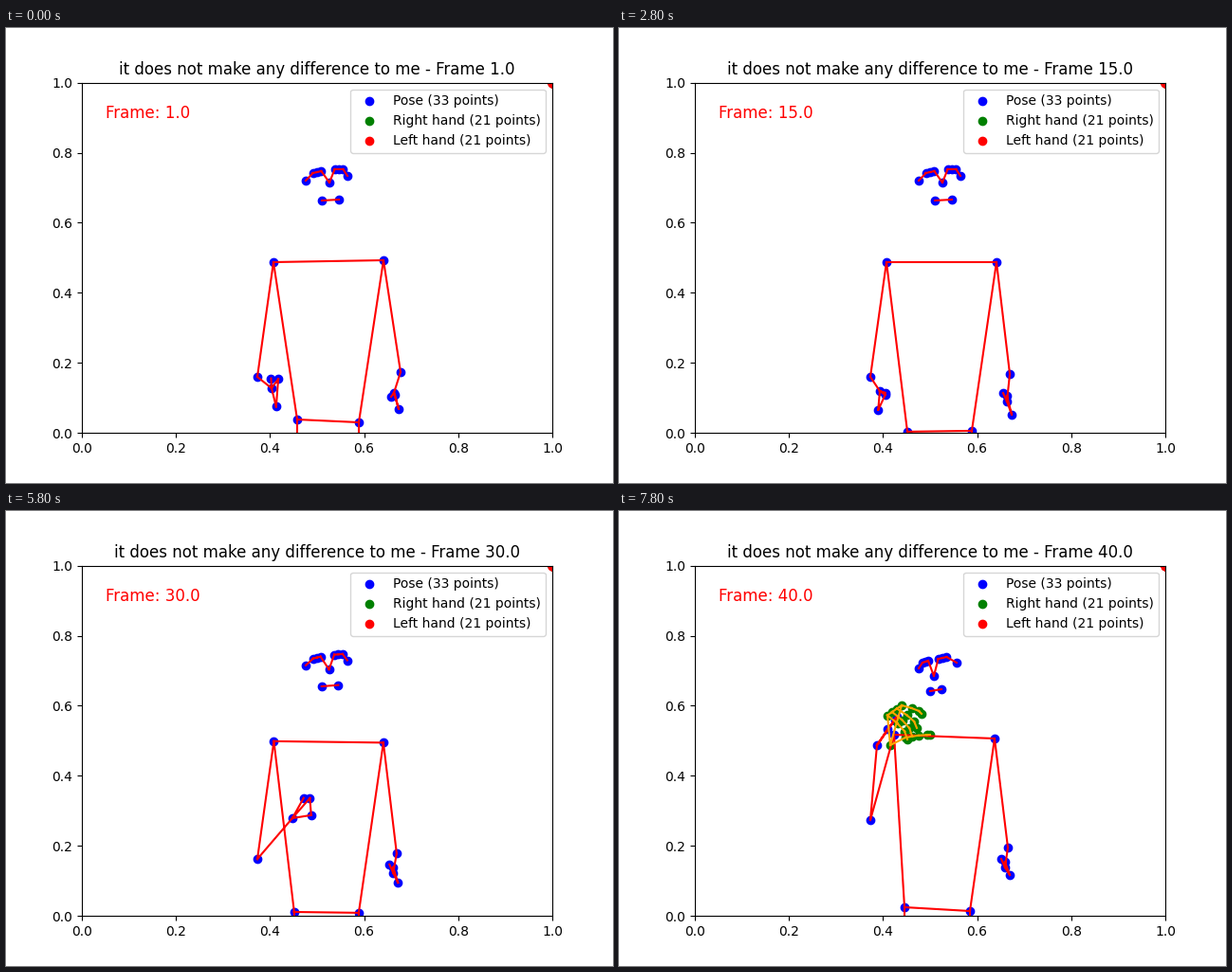
Animation, 640 px wide and 480 px high, one loop 8000 ms. Source, as a matplotlib script:

```python
import numpy as np
import matplotlib.pyplot as plt
from matplotlib.animation import FuncAnimation

FRAMES, STEP = 40, 200
TITLE = "it does not make any difference to me"

# Stage pixels: standing pose and the pose after the turn
JOINTS = {
    "nose": [(341, 163), (332, 174)],
    "eye_l": [(351, 149), (341, 155)],
    "eye_r": [(328, 152), (323, 159)],
    "ear_l": [(360, 156), (356, 160)],
    "ear_r": [(316, 161), (316, 166)],
    "mouth_l": [(351, 181), (340, 188)],
    "mouth_r": [(333, 182), (328, 190)],
    "shoulder_l": [(398, 247), (396, 240)],
    "shoulder_r": [(282, 247), (290, 236)],
    "elbow_l": [(412, 365), (410, 355)],
    "hip_l": [(372, 425), (370, 422)],
    "hip_r": [(304, 426), (301, 418)],
    "knee_l": [(372, 560), (370, 560)],
    "knee_r": [(307, 560), (301, 560)],
}
# Offsets at the start that fade as the body settles
SETTLE = {"hip_l": (0, -9), "hip_r": (3, -13), "shoulder_l": (0, -2),
          "elbow_l": (4, -2), "index_l": (1, 8), "thumb_l": (1, 13)}

# Rising arm: time, wrist x, wrist y, palm angle, reach, finger spread
RAISE = np.array([
    (1, 280, 380, -76, 12, 130),
    (9, 277, 392, -106, 4, -60),
    (15, 275, 383, -95, 7, 60),
    (25, 308, 361, -10, 30, 32),
    (30, 302, 324, 9, 28, 40),
    (36, 273, 301, 87, 34, -3),
    (40, 272, 247, 56, 37, -1),
])
HAND_SEEN = (31, 32, 39, 40)
HAND_BONES = [(0, 1), (0, 5), (0, 17), (5, 9), (9, 13), (13, 17)]
HAND_BONES += [(b + i, b + i + 1) for b in range(1, 21, 4) for i in range(3)]


def bone_list():
    bones = [("mouth_l", "mouth_r"), ("shoulder_l", "shoulder_r"), ("hip_l", "hip_r")]
    for s in ("_l", "_r"):
        for chain in ("nose in eye out ear", "shoulder elbow wrist pinky index",
                      "index wrist thumb", "shoulder hip knee"):
            names = [n if n == "nose" else n + s for n in chain.split()]
            bones += zip(names, names[1:])
    return bones


BONES = bone_list()


def polar(angle, length):
    a = np.radians(angle)
    return length * np.array([np.cos(a), -np.sin(a)])


def turn(k):
    return np.clip((k - 24) / 16, 0, 1)


def raised_arm(k):
    x, y, angle, reach, spread = (np.interp(k, RAISE[:, 0], c) for c in RAISE.T[1:])
    wrist = np.array([x, y])
    return {
        "elbow_r": np.array([265, 368 - 42 * turn(k) ** 4]),
        "wrist_r": wrist,
        "pinky_r": wrist + polar(angle, 20),
        "index_r": wrist + polar(angle + spread, reach),
        "thumb_r": wrist + polar(angle + 1.3 * spread, 0.87 * reach),
    }


def hanging_hand(k):
    wrist = np.array([409 - 2 * turn(k), 385 + 9 * np.cos((k - 14) * np.pi / 26)])
    return {
        "wrist_l": wrist,
        "pinky_l": wrist + (5, 17 - 9 * k / FRAMES),
        "index_l": wrist + (0, -6),
        "thumb_l": wrist + (-4, -9),
    }


def pose(k):
    q = turn(k)
    ease = np.array([q ** 3, q])
    joints = {n: a + np.subtract(b, a) * ease for n, (a, b) in JOINTS.items()}
    joints.update(raised_arm(k))
    joints.update(hanging_hand(k))
    for name, off in SETTLE.items():
        joints[name] = joints[name] + np.multiply(off, np.exp((1 - k) / 3))
    for side, off in (("_l", (-4.4, q)), ("_r", (4.4 - 1.4 * q, -1))):
        joints["in" + side] = joints["eye" + side] + off
        joints["out" + side] = joints["eye" + side] - off
    return joints


def hand_shape():
    """Root, a thumb swept sideways and four fingers curling over it."""
    points = [(0, 0)]
    points += [(42 * np.sin(i * np.pi / 8), -11 * (1 - 0.27 ** i)) for i in range(1, 5)]
    for j in range(4):
        drop = 8.5 * min(1, 0.35 + 0.45 * j)
        points += [(12 - 5 * j + 21 * np.sin(i * np.pi / 6), -42 + 3.5 * j + drop * i)
                   for i in range(4)]
    return np.array(points)


HAND = hand_shape()


def to_data(px):
    return (np.asarray(px) - (80, 427.2)) / (496, -369.6)


def hand(k, wrist):
    if k not in HAND_SEEN:
        return np.ones((21, 2))
    return to_data(HAND + wrist + (14 * turn(k) ** 2, 0))


def segments(points, bones):
    gap = (np.nan, np.nan)
    return np.array([q for a, b in bones for q in (points[a], points[b], gap)]).T


fig, ax = plt.subplots(figsize=(6.4, 4.8), dpi=100)
ax.set(xlim=(0, 1), ylim=(0, 1))
title = ax.set_title("")
label = ax.text(0.05, 0.9, "", color="red", fontsize=12)
body_dots = ax.scatter([], [], color="blue", label="Pose (33 points)")
hand_dots = ax.scatter([], [], color="green", label="Right hand (21 points)")
ax.scatter([1] * 21, [1] * 21, color="red", label="Left hand (21 points)")
body_lines, = ax.plot([], [], color="red")
hand_lines, = ax.plot([], [], color="orange")
ax.legend(loc="upper right")


def draw(i):
    k = i + 1
    title.set_text(f"{TITLE} - Frame {k:.1f}")
    label.set_text(f"Frame: {k:.1f}")
    body = pose(k)
    joints = {n: to_data(p) for n, p in body.items()}
    body_dots.set_offsets(list(joints.values()))
    body_lines.set_data(*segments(joints, BONES))
    fingers = hand(k, body["wrist_r"])
    hand_dots.set_offsets(fingers)
    hand_lines.set_data(*segments(fingers, HAND_BONES))
    return title, label, body_dots, hand_dots, body_lines, hand_lines


anim = FuncAnimation(fig, draw, frames=FRAMES, interval=STEP, repeat=True, repeat_delay=0)
plt.show()
```
